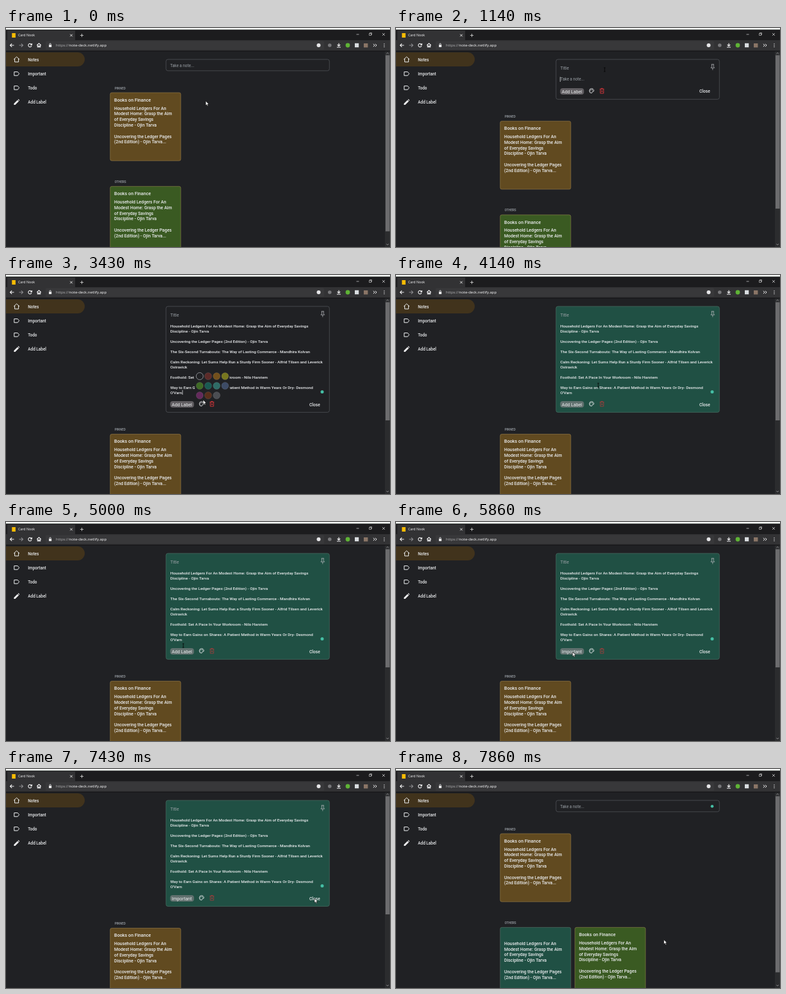
An HTML page with a canvas that plays this animation: 600 by 342 pixels, repeating every 8 s.

```html
<!DOCTYPE html>
<html lang="en">
<head>
<meta charset="utf-8">
<title>Card Nook</title>
<style>
html, body { margin: 0; width: 100%; height: 100%; overflow: hidden; background: #202124; }
canvas { display: block; width: 600px; height: 342px; }
</style>
</head>
<body>
<canvas id="stage"></canvas>
<script>
const W = 600, H = 342, LOOP = 8000, STEP = 1000 / 7;
const canvas = document.getElementById('stage');
const ctx = canvas.getContext('2d');
const dpr = window.devicePixelRatio || 1;
canvas.width = W * dpr;
canvas.height = H * dpr;

const BG = '#202124', WHITE = '#eceef0', DIM = '#9aa0a6', LINE = '#4e5156';
const BROWN = '#614a20', GREEN = '#3a5a22', TEAL = '#205044';
const UI = '"Open Sans", sans-serif', APP = 'Roboto, sans-serif';

// Steps at which the interface changes
const OPEN = 5, PASTE = 11, PALETTE = 22, TINT = 29, LABEL = 41, CLOSE = 53;

// Pointer path: step, x, y
const PATH = [
  [1, 312, 114], [4, 326, 64], [8, 326, 65], [17, 326, 65], [21, 306, 198],
  [24, 308, 195], [25, 308, 195], [28, 316, 172], [30, 316, 172], [33, 277, 193],
  [35, 277, 193], [37, 275, 202], [42, 276, 203], [48, 391, 216.5],
  [49, 391, 216.5], [52, 482, 202], [53, 482, 202], [55, 418.5, 266.5]
];

const CARD_LINES = [
  'Household Ledgers For An', 'Modest Home: Grasp the Aim', 'of Everyday Savings',
  'Discipline - Ojin Tarva', '', 'Uncovering the Ledger Pages', '(2nd Edition) - Ojin Tarva...'
];
const NOTE_LINES = [
  'Household Ledgers For An Modest Home: Grasp the Aim of Everyday Savings',
  'Discipline - Ojin Tarva', '',
  'Uncovering the Ledger Pages (2nd Edition) - Ojin Tarva', '',
  'The Six-Second Turnabouts: The Way of Lasting Commerce - Mandhira Kolvan', '',
  'Calm Reckoning: Let Sums Help Run a Sturdy Firm Sooner - Alfrid Tilsen and Leverick',
  'Ostravick', '',
  'Foothold: Set A Pace In Your Workroom - Nilo Harstem', '',
  'Way to Earn Gains on Shares: A Patient Method in Warm Years Or Dry- Desmond',
  "O'Varn"
];
const SWATCHES = [BG, '#5c2b29', '#73501c', '#77771f', '#3f6a25', '#1a5a52',
  '#2f6c66', '#3d4b66', '#642a5c', '#592f1c', '#4b4d52'];

function rect(x, y, w, h, fill) {
  ctx.fillStyle = fill;
  ctx.fillRect(x, y, w, h);
}

function box(x, y, w, h, r, fill, stroke) {
  ctx.beginPath();
  ctx.roundRect(x, y, w, h, r);
  if (fill) { ctx.fillStyle = fill; ctx.fill(); }
  if (stroke) { ctx.strokeStyle = stroke; ctx.lineWidth = 0.8; ctx.stroke(); }
}

function dot(x, y, r, fill, stroke) {
  ctx.beginPath();
  ctx.arc(x, y, r, 0, Math.PI * 2);
  if (fill) { ctx.fillStyle = fill; ctx.fill(); }
  if (stroke) { ctx.strokeStyle = stroke; ctx.lineWidth = 0.8; ctx.stroke(); }
}

function text(str, x, y, size, color, weight = 400, family = APP) {
  ctx.font = `${weight} ${size}px ${family}`;
  ctx.fillStyle = color;
  ctx.fillText(str, x, y);
}

// SVG path data drawn around a point
function icon(d, x, y, color, width = 1, fill) {
  const p = new Path2D(d);
  ctx.save();
  ctx.translate(x, y);
  if (fill) { ctx.fillStyle = fill; ctx.fill(p); }
  if (width) { ctx.strokeStyle = color; ctx.lineWidth = width; ctx.stroke(p); }
  ctx.restore();
}

function drawBrowser() {
  rect(0, 0, W, 19, '#1c1c1e');
  rect(0, 0, W, 2.5, '#f3faf3');
  rect(2, 4, 106, 15, '#323234');
  rect(9.3, 8, 5.6, 7, '#fbbc04');
  text('Card Nook', 19, 13.3, 5.3, '#f9f9fa', 400, UI);
  icon('M-1.8-1.8L1.8 1.8M1.8-1.8L-1.8 1.8', 102, 11.5, '#eee', 0.9);
  icon('M-2.6 0H2.6M0-2.6V2.6', 118.5, 11.5, '#ddd', 0.8);
  icon('M-2 0H2', 549.5, 10, '#ddd', 0.7);
  icon('M-2-1H1V2H-2ZM-1-1V-2H2V1H1', 569.5, 9.5, '#ddd', 0.6);
  icon('M-2-2L2 2M2-2L-2 2', 590, 10, '#ddd', 0.7);

  rect(0, 19, W, 17, '#323234');
  rect(0, 35.5, W, 1, '#111113');
  box(62, 20.5, 435, 13.5, 1.5, '#38383a');
  icon('M3 0H-3M-.3-2.7L-3 0L-.3 2.7', 9.5, 27, '#f4f4f5', 1.1);
  icon('M-3 0H3M.3-2.7L3 0L.3 2.7', 23.5, 27, '#8a8a8d', 1.1);
  icon('M2.4-1A2.6 2.6 0 1 0 2.4 1M2.9-3V-.6H.5', 37.5, 27, '#f4f4f5', 1.1);
  icon('M-3.2 0L0-3L3.2 0M-2.2-.6V2.8H-.6V.8H.6V2.8H2.2V-.6', 51.5, 27, '#f4f4f5', 1.1);
  box(67, 26.3, 4.2, 3.4, 0.5, '#f4f4f5');
  icon('M-1.2 0V-1A1.2 1.2 0 0 1 1.2-1V0', 69.1, 26.3, '#f4f4f5', 0.8);
  text('https://', 78, 29.2, 6, '#b1b1b3', 400, UI);
  const w = ctx.measureText('https://').width;
  text('note-deck.netlify.app', 78 + w, 29.2, 6, '#f9f9fa', 400, UI);

  dot(488.5, 27, 3, '#e6e6e8');
  dot(505.8, 27, 2.8, '#77777a');
  icon('M0-3.2V1M-2.2-1L0 1.2L2.2-1M-3 3H3', 520, 27, '#f4f4f5', 1.1);
  dot(534, 27, 3.4, '#5fb336');
  rect(545, 23.8, 6.2, 6.4, '#d9dde0');
  rect(559, 24, 6.4, 6.4, '#8a7566');
  icon('M-2.6-2.2L-.4 0L-2.6 2.2M.4-2.2L2.6 0L.4 2.2', 576.5, 27, '#f4f4f5');
  for (const dy of [-2.4, 0, 2.4]) dot(591, 27 + dy, 0.7, '#e6e6e8');
}

function drawSidebar() {
  box(-12, 38, 135, 22, 11, '#41331c');
  ['Notes', 'Important', 'Todo', 'Add Label'].forEach((name, i) =>
    text(name, 34.3, 51.5 + 22.2 * i, 6.4, WHITE, 500));
  icon('M-4.4 0L0-4L4.4 0M-3-1V4H3V-1', 16.6, 49, WHITE);
  for (const y of [71.4, 93.4])
    icon('M-3.8-2.9H1.6L4 0L1.6 2.9H-3.8Z', 16.6, y, WHITE);
  icon('M-4 4V2L1.6-3.6L3.6-1.6L-2 4ZM2.2-4.2L3-5L5-3L4.2-2.2Z', 16.4, 116, WHITE, 0, '#f4f4f5');
}

function drawScrollbar(extra) {
  rect(592, 36.5, 8, H, '#2b2c2e');
  rect(593, 42.5, 6.5, 275 * 301 / (301 + extra), '#6c6c6e');
  icon('M-1.8 1L0-1L1.8 1', 596.2, 39.5, '#9a9a9c', 0.8);
  icon('M-1.8-1L0 1L1.8-1', 596.2, 338, '#9a9a9c', 0.8);
}

function drawCard(x, y, color, title) {
  const edge = color === TEAL ? 'rgba(200,220,200,.25)' : 'rgba(230,190,110,.4)';
  box(x, y, 110.3, 106.4, 2.5, color, edge);
  if (title) text(title, x + 6.3, y + 13.7, 7.2, WHITE, 500);
  const top = y + (title ? 26.6 : 27.5);
  CARD_LINES.forEach((line, i) => text(line, x + 6.3, top + 8.83 * i, 6.85, WHITE, 500));
}

function drawNotes(shift, added) {
  text('PINNED', 169.7, 95.7 + shift, 4.8, DIM, 500);
  drawCard(162.8, 100.9 + shift, BROWN, 'Books on Finance');
  text('OTHERS', 169.7, 241.8 + shift, 4.8, DIM, 500);
  if (added) drawCard(162.8, 247.3 + shift, TEAL);
  drawCard(added ? 279.6 : 162.8, 247.3 + shift, GREEN, 'Books on Finance');
}

function drawPalette() {
  rect(295, 151, 54.5, 44, BG);
  SWATCHES.forEach((c, i) => dot(302.7 + 13.2 * (i % 4), 158 + 15 * Math.floor(i / 4),
    5.5, c, i ? 'rgba(255,255,255,.12)' : '#a0a3a7'));
}

function drawForm(s) {
  const teal = s.tinted && s.open;
  box(250, 49, 255.3, s.bottom - 49, 3, teal ? TEAL : BG, teal ? '#44695e' : LINE);
  if (!s.open) {
    text('Take a note...', 256.5, 61.2, 6.3, DIM);
    if (s.added) dot(494, 58.2, 2.3, '#45bfa5');
    return;
  }
  text('Title', 256.7, 65.2, 7, DIM);
  icon('M-2-4.2H2M-1.4-4.2V-.6L-2.8 1.2H2.8L1.4-.6V-4.2M0 1.2V4.6', 494.8, 61, '#b5b8bc', 0.8);

  if (s.filled) {
    NOTE_LINES.forEach((line, i) => text(line, 256.7, 82.2 + 7.97 * i, 6.25, WHITE, 500));
    dot(494, 182.6, 2.5, '#45bfa5');
    if (!s.tinted)
      rect(257.2 + ctx.measureText(NOTE_LINES.at(-1)).width, 179.6, 0.7, 7.4, WHITE);
  } else {
    text('Take a note...', 257, 82.3, 6.27, DIM);
    rect(256.4, 76.4, 0.7, 7.6, WHITE);
  }

  const y = s.bottom - 12.3;
  box(256.5, y - 5, 37.2, 10, 4, 'rgba(140,135,140,.6)');
  text(s.labelled ? 'Important' : 'Add Label', 259, y + 2.5, 7.15, WHITE);
  drawPaletteIcon(305.6, y - 0.9);
  ctx.globalAlpha = s.tinted ? 0.65 : 1;
  icon('M-3.4-3H3.4M-1.2-3V-4H1.2V-3M-2.6-3V3.7H2.6V-3M-1.2-1L1.2 1.6M1.2-1L-1.2 1.6', 321.8, y - 0.7, '#d9363a', 0.9);
  ctx.globalAlpha = 1;
  text('Close', 474, y + 2.4, 6.6, WHITE, 500);
  if (s.palette) drawPalette();
}

function drawPaletteIcon(x, y) {
  icon('M0-3.5A3.5 3.5 0 1 0 0 3.5C1.2 3.5 .2 1.8 1.2 1.4C2.2 1.2 3.5 1.6 3.5-.3C3.4-2.2 1.9-3.5 0-3.5Z', x, y, WHITE, 0.9);
  for (const [dx, dy] of [[-1.8, -0.2], [-0.8, -1.7], [0.9, -1.7], [2, -0.4]])
    dot(x + dx, y + dy, 0.55, WHITE);
}

function pointerAt(n) {
  if (n <= PATH[0][0]) return PATH[0].slice(1);
  const i = PATH.findIndex(p => p[0] >= n);
  const [a, ax, ay] = PATH[i - 1], [b, bx, by] = PATH[i];
  const u = (n - a) / (b - a), k = u * u * (3 - 2 * u);
  return [ax + (bx - ax) * k, ay + (by - ay) * k];
}

function drawPointer(n, s) {
  if (n >= PASTE && n < 18) return;
  const [x, y] = pointerAt(n);
  const limit = s.open ? s.bottom - 20 : s.bottom;
  const overText = x > 250 && x < 505 && y > 50 && y < limit && !s.palette;
  if (overText) icon('M-1.3-3H1.3M0-3V3M-1.3 3H1.3', x, y, '#050505', 0.8);
  else icon('M0 0V7L1.6 5.6L2.7 8L3.9 7.4L2.8 5.1H4.9Z', x, y, '#111', 0.6, '#fff');
}

function draw(time) {
  const n = Math.min(55, Math.floor((time % LOOP + 5) / STEP));
  const s = {
    open: n >= OPEN && n < CLOSE,
    filled: n >= PASTE,
    palette: n >= PALETTE && n < TINT,
    tinted: n >= TINT,
    labelled: n >= LABEL,
    added: n >= CLOSE
  };
  s.bottom = !s.open ? 66.8 : s.filled ? 214.4 : 111.3;
  const shift = s.bottom - 66.8;

  ctx.setTransform(dpr, 0, 0, dpr, 0, 0);
  rect(0, 0, W, H, BG);
  drawNotes(shift, s.added);
  drawForm(s);
  drawSidebar();
  drawScrollbar(shift);
  drawBrowser();
  drawPointer(n, s);
}

const start = performance.now();
function tick() {
  draw(performance.now() - start);
  requestAnimationFrame(tick);
}
tick();
</script>
</body>
</html>
```
